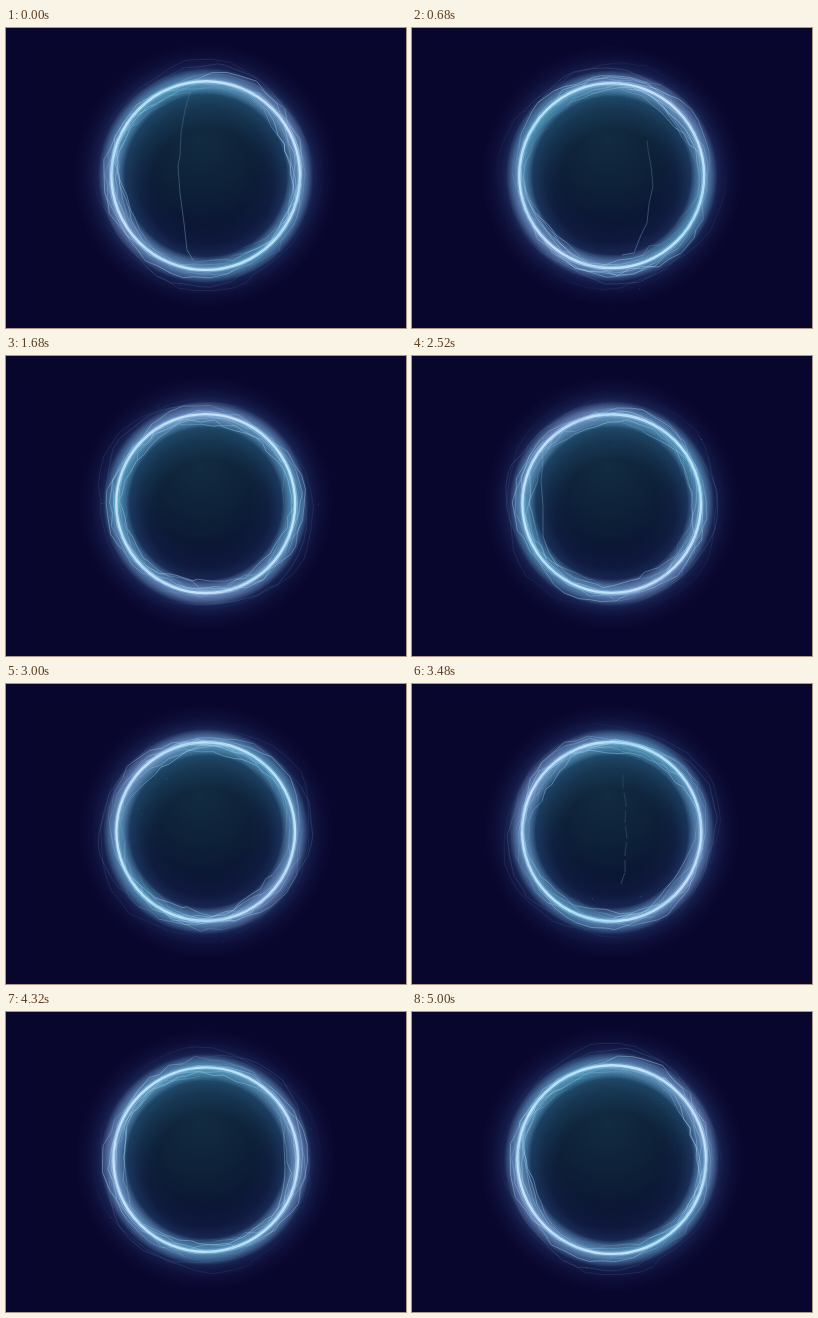
Animation, 400 px wide and 300 px high, one loop 5.04 s. Source, as an HTML page with a canvas:

```html
<!DOCTYPE html>
<html lang="en">
<head>
<meta charset="utf-8">
<title>Electric ring</title>
<style>
  html, body { margin: 0; width: 100%; height: 100%; overflow: hidden; background: #09062e; }
  canvas { display: block; }
</style>
</head>
<body>
<canvas id="stage" width="400" height="300"></canvas>
<script>
const ctx = document.getElementById('stage').getContext('2d');
const LOOP = 5040, TAU = Math.PI * 2, CX = 199.7, CY = 147.6;

let seed = 29;
const random = () => {
  seed = (seed * 16807) % 2147483647;
  return seed / 2147483647;
};
const between = (a, b) => a + (b - a) * random();
const whole = (a, b) => Math.floor(between(a, b + 1));
const clamp = v => Math.max(0, Math.min(1, v));
const rgba = (rgb, a) => `rgba(${rgb},${a})`;

// Integer cycle counts keep every motion seamless over the loop.
const makeStrand = (base, wave, jag, alpha) => ({
  base, wave, alpha,
  phase: between(0, TAU), turns: whole(-3, 3) || 2,
  lobes: whole(2, 4), fade: between(0, TAU), fadeTurns: whole(-4, 4) || 1,
  nodes: Array.from({ length: 46 }, (_, i) => ({
    angle: (i + between(-0.3, 0.3)) / 46 * TAU,
    size: between(0.2, 1) * jag, phase: between(0, TAU), cycles: whole(3, 9)
  }))
});
const strands = [
  ...Array.from({ length: 10 }, (_, i) => makeStrand(i * 1.6 - 8, 4, 3.2, 0.6)),
  makeStrand(14, 4, 2, 0.2),
  makeStrand(18, 4, 2, 0.14)
];

const sparks = Array.from({ length: 42 }, () => ({
  angle: between(0, TAU), start: between(0, LOOP), life: between(400, 900),
  from: random() < 0.5 ? between(55, 80) : between(100, 116),
  drift: between(4, 18), size: between(0.6, 1.1)
}));

const bolts = [
  { start: 5010, life: 230, path: [[187, 232], [181, 222], [178, 195], [174, 165], [172, 138], [174, 128], [175, 105], [179, 82], [184, 64]] },
  { start: 560, life: 320, path: [[210, 227], [222, 225], [229, 207], [235, 195], [237, 176], [241, 158], [239, 138], [236, 122], [235, 112]] },
  { start: 2380, life: 300, path: [[146, 211], [137, 197], [131, 180], [131, 150], [129, 125], [131, 105], [130, 94], [137, 82], [150, 70]] },
  { start: 3260, life: 300, broken: true, path: [[209, 200], [213, 188], [213, 170], [215, 154], [213, 139], [214, 120], [211, 103], [211, 90]] }
];

function radial(x, y, r, stops) {
  const g = ctx.createRadialGradient(x, y, 0, x, y, r);
  for (const [at, color] of stops) g.addColorStop(at, color);
  return g;
}

function circle(r) {
  ctx.beginPath();
  ctx.arc(CX, CY, r, 0, TAU);
}

function drawGlow(r) {
  circle(r);
  ctx.fillStyle = radial(CX - 4, CY - 36, r * 1.45, [
    [0, '#122b41'], [0.4, '#0d2038'], [0.75, '#0a1133'], [1, '#0a0b31']
  ]);
  ctx.fill();

  const reach = r + 38, at = d => (r + d) / reach;
  const blue = a => rgba('72,128,195', a);
  ctx.fillStyle = radial(CX, CY, reach, [
    [0, blue(0)], [at(-45), blue(0)], [at(-26), blue(0.07)], [at(-14), blue(0.2)],
    [at(-4), blue(0.48)], [at(3), blue(0.5)], [at(10), blue(0.3)],
    [at(18), blue(0.15)], [at(27), blue(0.055)], [1, blue(0)]
  ]);
  ctx.fillRect(0, 0, 400, 300);

  // A cyan wash along the upper inside edge.
  const teal = a => rgba('50,145,175', a);
  circle(r);
  ctx.fillStyle = radial(CX + 4, CY + 16, r + 18, [
    [0, teal(0)], [0.55, teal(0)], [0.83, teal(0.17)], [1, teal(0.38)]
  ]);
  ctx.fill();
}

function drawRing(r, turn) {
  // Two opposite lavender lobes make half a turn per loop.
  const tint = ctx.createConicGradient(TAU * 0.42 - turn / 2, CX, CY);
  ['#a2bdec', '#76c6e2', '#a2bdec', '#76c6e2', '#a2bdec']
    .forEach((color, i) => tint.addColorStop(i / 4, color));
  circle(r);
  ctx.strokeStyle = tint;
  ctx.globalAlpha = 0.045;
  for (let width = 26; width > 6; width -= 1.5) {
    ctx.lineWidth = width;
    ctx.stroke();
  }
  ctx.globalAlpha = 0.5;
  ctx.lineWidth = 5;
  ctx.stroke();
  ctx.globalAlpha = 1;
  ctx.lineWidth = 2.4;
  ctx.strokeStyle = 'rgba(207,235,252,.88)';
  ctx.stroke();
}

function drawStrand(s, r, turn) {
  const points = s.nodes.map(n => {
    const d = r + s.base + s.wave * Math.sin(s.lobes * n.angle + s.phase + s.turns * turn)
      + n.size * Math.sin(n.phase + n.cycles * turn);
    return [CX + d * Math.cos(n.angle), CY + d * Math.sin(n.angle)];
  });
  ctx.lineWidth = 0.8;
  points.forEach((p, i) => {
    const next = points[(i + 1) % points.length];
    const light = 0.5 + 0.5 * Math.sin(2 * s.nodes[i].angle + s.fade + s.fadeTurns * turn);
    ctx.strokeStyle = rgba('155,203,235', s.alpha * light);
    ctx.beginPath();
    ctx.moveTo(...p);
    ctx.lineTo(...next);
    ctx.stroke();
  });
}

function drawBolt(b, time) {
  const age = (time - b.start + LOOP) % LOOP / b.life;
  if (age > 1) return;
  const count = b.path.length - 1;
  const head = b.start > 5000 ? count : count * clamp(0.35 + age * 1.7);
  const alpha = 0.5 * clamp((1 - age) * 2.5);
  ctx.lineWidth = 0.8;
  ctx.setLineDash(b.broken && age > 0.4 ? [12, 4, 7, 6] : []);
  for (let i = 0; i < head; i++) {
    const part = clamp(head - i), [x, y] = b.path[i], [nx, ny] = b.path[i + 1];
    ctx.strokeStyle = rgba('150,190,220', alpha * (1 - 0.55 * i / count));
    ctx.beginPath();
    ctx.moveTo(x, y);
    ctx.lineTo(x + (nx - x) * part, y + (ny - y) * part);
    ctx.stroke();
  }
  ctx.setLineDash([]);
}

function drawSpark(s, r, time) {
  const age = (time - s.start + LOOP) % LOOP / s.life;
  if (age > 1) return;
  const d = (s.from + s.drift * age) * r / 92;
  ctx.fillStyle = rgba('90,140,205', 0.5 * Math.sin(Math.PI * age));
  ctx.fillRect(CX + d * Math.cos(s.angle), CY + d * Math.sin(s.angle), s.size, s.size);
}

function frame(now) {
  const time = now % LOOP, turn = time / LOOP * TAU;
  const r = 89.3 + 5 * ((1 + Math.cos(turn)) / 2) ** 2.5;
  ctx.fillStyle = '#09062e';
  ctx.fillRect(0, 0, 400, 300);
  drawGlow(r);
  sparks.forEach(s => drawSpark(s, r, time));
  bolts.forEach(b => drawBolt(b, time));
  drawRing(r, turn);
  strands.forEach(s => drawStrand(s, r, turn));
  requestAnimationFrame(frame);
}
requestAnimationFrame(frame);
</script>
</body>
</html>
```
